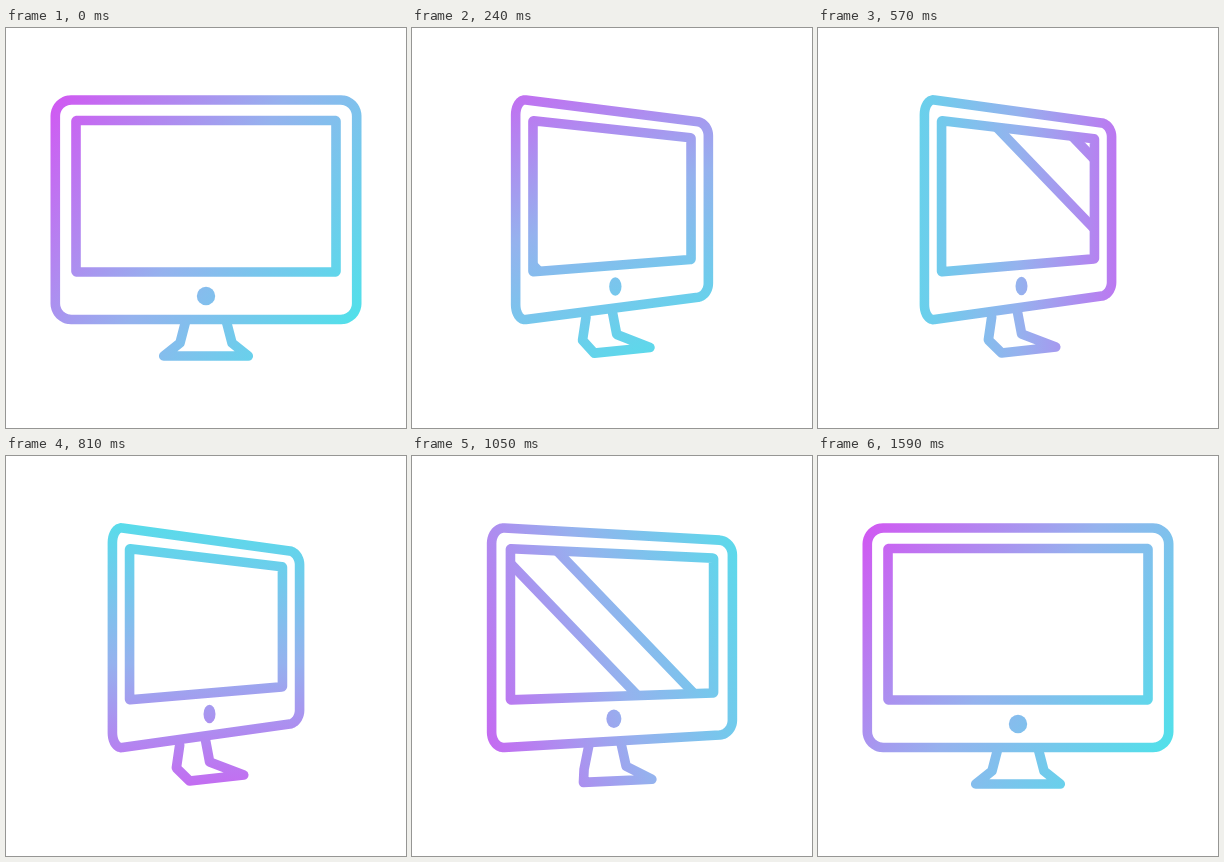
An HTML page with a canvas for the animation above (3620 ms loop, 400 px wide and 400 px high).

```html
<!DOCTYPE html>
<html lang="en">
<head>
<meta charset="utf-8">
<title>Turning monitor</title>
<style>
html, body { margin: 0; width: 100%; height: 100%; overflow: hidden; background: #fff; }
canvas { display: block; width: 400px; height: 400px; }
</style>
</head>
<body>
<canvas id="stage" width="400" height="400"></canvas>
<script>
const ctx = document.getElementById('stage').getContext('2d');
const LOOP = 3620, STEP = 30, END = 1590, TURN = 291, BACK = 1200;
const MID = 200, EYE = 180.6;

// Cubic ease with handles at one half
function ease(x) {
  if (x <= 0) return 0;
  if (x >= 1) return 1;
  let lo = 0, hi = 1, s = 0.5;
  for (let i = 0; i < 20; i++) {
    s = (lo + hi) / 2;
    if (1.5 * s * (1 - s) + s ** 3 < x) lo = s; else hi = s;
  }
  return s * s * (3 - 2 * s);
}

// Perspective: narrow the width and shrink the right side towards eye level
function turn(x, y, p, squeeze) {
  const shrink = 0.223 * (x - 66) / 284;
  return [MID + (x - MID) * (1 - squeeze * p), y + (EYE - y) * shrink * p];
}

function trace(points, closed) {
  ctx.beginPath();
  for (const [x, y] of points) ctx.lineTo(x, y);
  if (closed) ctx.closePath();
}

// Rounded rectangle, turned by p
function panel(half, top, bottom, r, p, squeeze) {
  const points = [], steps = 10;
  for (let corner = 0; corner < 4; corner++) {
    const cx = corner % 3 ? MID + half - r : MID - half + r;
    const cy = corner < 2 ? top + r : bottom - r;
    for (let i = 0; i <= steps; i++) {
      const a = (corner + 2 + i / steps) * Math.PI / 2;
      points.push(turn(cx + r * Math.cos(a), cy + r * Math.sin(a), p, squeeze));
    }
  }
  trace(points, true);
}

// Half width, height and sideways shift of the neck, knee and foot
const STAND = [[20, 292, -13.5], [26, 315, -13], [42.3, 328, 10.7]];

function stand(p) {
  const side = s => STAND.map(([half, y, shift]) =>
    [MID + s * half * (1 - 0.36 * p) + shift * p, y - (6 + 3 * s) * p]);
  trace([...side(-1), ...side(1).reverse()]);
}

// One full spin that starts quickly and settles slowly
function gradient(t) {
  const spin = 1 - (1 - (t / END) ** 1.8) ** 3;
  const a = (35 + 360 * spin) * Math.PI / 180;
  const half = 165 + 20 * Math.cos(a - Math.PI / 6);
  const dx = half * Math.cos(a), dy = half * Math.sin(a);
  const cy = 192 - 15 * Math.sin(a);
  const g = ctx.createLinearGradient(MID - dx, cy - dy, MID + dx, cy + dy);
  ['#cf5bf2', '#95b2ee', '#52e0ea'].forEach((c, i) => g.addColorStop(i / 2, c));
  return g;
}

// A pair of slanted lines sweeping to the right
function shine(time, p) {
  const x = 145 + 0.76 * time - 0.0003 * time * time;
  for (const left of [x, x - 55 - 12 * p * p]) {
    trace([[left - 50, 43], [left + 200, 303]]);
    ctx.stroke();
  }
}

function draw(t) {
  const p = ease(t / TURN) - ease((t - BACK + TURN) / TURN);
  ctx.clearRect(0, 0, 400, 400);
  ctx.strokeStyle = ctx.fillStyle = gradient(t);
  ctx.lineWidth = 9.6;
  ctx.lineJoin = ctx.lineCap = 'round';

  panel(130, 92.5, 244, 1, p, 0.412);
  ctx.stroke();
  ctx.save();
  ctx.clip();
  shine(t - 436, p);
  shine(t - 1050, p);
  ctx.restore();

  panel(150.7, 72, 291.5, 16, p, 0.379);
  ctx.stroke();
  stand(p);
  ctx.stroke();
  ctx.beginPath();
  ctx.ellipse(MID + 3.5 * p, 268 - 10 * p, 9.2 - 3.2 * p, 9.2, 0, 0, 2 * Math.PI);
  ctx.fill();
}

const start = performance.now();
function tick() {
  const t = (performance.now() - start) % LOOP;
  draw(Math.min(END, Math.floor(t / STEP) * STEP));
  requestAnimationFrame(tick);
}
tick();
</script>
</body>
</html>
```
